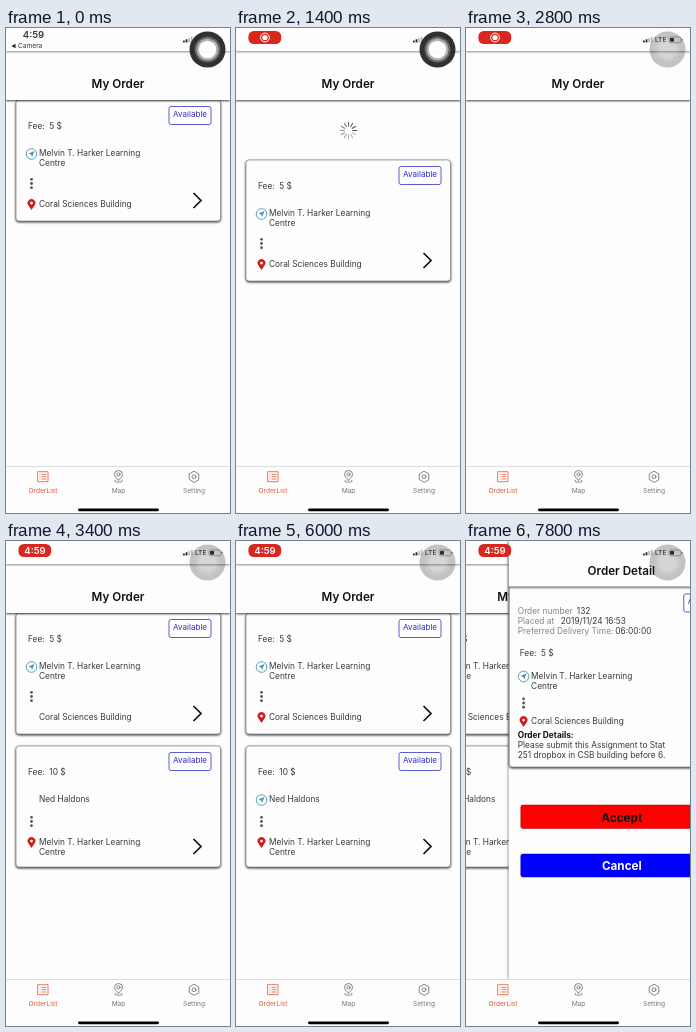
Write an HTML page that moves like this. It is 224x485 px and loops after 8 s.

```html
<!DOCTYPE html>
<html lang="en">
<head>
<meta charset="utf-8">
<title>My Order</title>
<style>
  html, body { margin: 0; width: 100%; height: 100%; overflow: hidden; background: #fefdfe; }
  svg { display: block; width: 100%; height: 100%; }
  text { font: 8.3px Inter, sans-serif; fill: #383838; white-space: pre; }
  .mid { text-anchor: middle; }
  .title { font-size: 11.7px; font-weight: 600; fill: #111; }
  .blue { fill: #2c2cc8; font-size: 8.1px; }
  .grey { fill: #858585; }
  .bold { font-weight: 700; fill: #111; }
  .time { font-size: 9.6px; font-weight: 600; }
  .tab { font-size: 6.6px; fill: #777; }
  .page { fill: #fefdfe; }
  .card { fill: #fefdfe; stroke: #888; stroke-width: .7; filter: drop-shadow(.8px 1px 1.1px rgba(0,0,0,.8)); }
  .bar { fill: #fefdfe; filter: drop-shadow(0 1px 1.1px rgba(0,0,0,.75)); }
  .line { fill: none; stroke: currentColor; stroke-width: .8; stroke-linecap: round; stroke-linejoin: round; }
</style>
</head>
<body>
<svg id="stage" viewBox="0 0 224 485" preserveAspectRatio="none"></svg>
<script>
const LOOP = 8000, STEP = 200, WIDTH = 224;
const hall = ['Melvin T. Harker Learning', 'Centre'];
const lab = ['Coral Sciences Building'];
const cafe = ['Ned Haldons'];

const text = (x, y, s, cls = '') => `<text x="${x}" y="${y}" class="${cls}">${s}</text>`;
const at = (x, y, body, attrs = '') => `<g transform="translate(${x} ${y})" ${attrs}>${body}</g>`;
const rect = (x, y, w, h, attrs) => `<rect x="${x}" y="${y}" width="${w}" height="${h}" ${attrs}/>`;
const disc = (x, y, r, attrs) => `<circle cx="${x}" cy="${y}" r="${r}" ${attrs}/>`;
const lines = (x, y, list) => list.map((s, i) => text(x, y + i * 10.2, s)).join('');

const compass = (x, y, cls) => at(x, y, `
  <circle r="5.3" fill="#fff" stroke="#5a9fb8" stroke-width="1"/>
  <path d="M2.9-2.9L.6 3.1L-.4.4L-3.1-.6Z" fill="#4a93b3"/>`, `class="${cls}"`);
const pin = (x, y, cls) => at(x, y, `
  <path d="M0 5.6C-1 3.6-2.4 2.4-3.3.6A3.9 3.9 0 1 1 3.3.6C2.4 2.4 1 3.6 0 5.6Z" fill="#cf1d1b"/>
  <circle cy="-1.4" r="1.4" fill="#fff"/>`, `class="${cls}"`);
const dots = (x, y) => [-4.2, 0, 4.2].map(d => disc(x, y + d, 1.4, 'fill="#555"')).join('');
const badge = (x, y) => rect(x, y, 42, 18, 'rx="2" fill="#fff" stroke="#4a4ad0" stroke-width=".9"')
  + text(x + 21, y + 10, 'Available', 'blue mid');

function orderCard(y, fee, from, to, fromClass, toClass) {
  const dy = (from.length - 2) * 8;
  return at(0, y, rect(10, 0, 204.5, 121, 'rx="3" class="card"')
    + text(22, 29, `Fee:  ${fee} $`) + badge(163, 6.5)
    + compass(25.5, 54, fromClass) + lines(33, 56.2, from)
    + dots(25.5, 83.5 + dy)
    + pin(25.5, 104.5 + dy, toClass) + lines(33, 107.2 + dy, to)
    + '<path d="M187.5 93L195 100.5L187.5 108" fill="none" stroke="#111" stroke-width="1.7"/>');
}

const spinner = Array.from({ length: 12 }, (_, i) =>
  `<path d="M0-4.3V-8.2" stroke="#555" stroke-width="1.1" stroke-linecap="round"
    opacity="${0.35 + 0.65 * i / 11}" transform="rotate(${i * 30})"/>`).join('');

const listPage = `<g id="list">
  ${rect(0, 0, WIDTH, 438, 'class="page"')}
  ${at(112.5, 102.5, `<g id="spinner">${spinner}</g>`)}
  <g id="cards">
    ${orderCard(72, 5, hall, lab, '', 'late')}
    <g id="second">${orderCard(205, 10, cafe, hall, 'late', '')}</g>
  </g>
  ${rect(0, 0, WIDTH, 72, 'class="bar"')}
  ${rect(0, 0, WIDTH, 23, 'class="bar" style="opacity:.6"')}
  ${text(112, 60, 'My Order', 'title mid')}
</g>`;

const detailPage = `<g id="detail">
  ${rect(0, 0, WIDTH, 438, 'class="page" style="filter:drop-shadow(-1px 0 1px rgba(0,0,0,.35))"')}
  ${rect(.5, 44, 223, 182, 'rx="3" class="card"')}
  ${rect(0, 0, WIDTH, 45.5, 'class="bar"')}
  ${text(112.5, 33.5, 'Order Detail', 'title mid')}
  ${badge(175, 53)}
  ${text(9, 72.5, 'Order number', 'grey')}${text(68, 72.5, '132')}
  ${text(9, 82.7, 'Placed at', 'grey')}${text(52, 82.7, '2019/11/24 16:53')}
  ${text(9, 93, 'Preferred Delivery Time:', 'grey')}${text(106.5, 93, '06:00:00')}
  ${text(11, 114.5, 'Fee:  5 $')}
  ${compass(14.8, 135.5)}${lines(22.3, 138.2, hall)}
  ${dots(14.8, 162)}
  ${pin(14.8, 180.5)}${lines(22.3, 182.7, lab)}
  ${text(9, 196.8, 'Order Details:', 'bold')}
  ${lines(9, 207, ['Please submit this Assignment to Stat', '251 dropbox in CSB building before 6.'])}
  ${rect(12, 264, 201, 23.5, 'rx="2" fill="#f00" stroke="#a00" stroke-width=".5"')}
  ${rect(12, 313, 201, 23, 'rx="2" fill="#00f" stroke="#00a" stroke-width=".5"')}
  <text x="113" y="281.3" class="title mid" style="font-weight:700">Accept</text>
  <text x="113" y="329.3" class="title mid" style="font-weight:700;fill:#fff">Cancel</text>
</g>`;

const hexagon = Array.from({ length: 6 }, (_, i) => {
  const a = Math.PI * (i / 3 + .5);
  return `${5.5 * Math.cos(a)},${5.5 * Math.sin(a)}`;
}).join(' ');

const tabs = `
  ${rect(0, 438, WIDTH, 47, 'class="page"')}
  ${rect(0, 438, WIDTH, .7, 'fill="#d0d0d0"')}
  ${at(37, 448.7, `<path class="line" d="M-5-5H5V5H-5ZM-1-2.3H3M-1 0H3M-1 2.3H3M-3-2.3H-2.9M-3 0H-2.9M-3 2.3H-2.9"/>`, 'color="#dd5b36"')}
  ${at(112.5, 448.2, `<path class="line" d="M0 4C-1.5 2-4 .5-4-1.7A4 4 0 0 1 4-1.7C4 .5 1.5 2 0 4ZM-3 4C-5 5.8-2 6 0 6S5 5.8 3 4"/>
    <circle class="line" cy="-1.7" r="1.6"/>`, 'color="#666"')}
  ${at(188, 448.7, `<polygon class="line" points="${hexagon}"/><circle class="line" r="1.9"/>`, 'color="#666"')}
  <text x="37" y="465" class="tab mid" style="fill:#dd5b36">OrderList</text>
  ${text(112.5, 465, 'Map', 'tab mid')}${text(188, 465, 'Setting', 'tab mid')}
  ${rect(72, 480.4, 81, 2.8, 'rx="1.4" fill="#000"')}`;

const statusBar = `
  <g id="plain">
    ${text(27.5, 10.2, '4:59', 'time mid')}
    <path d="M5.5 18L9.5 15.8V20.2Z" fill="#222"/>
    <text x="12" y="20.2" style="font-size:6.6px">Camera</text>
  </g>
  <g id="pill">
    ${rect(12.4, 3, 32.8, 13, 'rx="5.5" fill="#d9261f"')}
    <g id="record">${disc(29, 9.5, 4.4, 'fill="none" stroke="#fff"')}${disc(29, 9.5, 2.6, 'fill="#fff"')}</g>
    <text id="clock" x="29" y="13" class="time mid" style="fill:#fff">4:59</text>
  </g>
  ${[0, 1, 2, 3].map(i => rect(177 + i * 2.6, 12.6 - i * 1.3, 1.8, 1.8 + i * 1.3, `fill="${i < 2 ? '#222' : '#bbb'}"`)).join('')}
  <text x="189" y="14.4" style="font-size:6.6px;font-weight:500">LTE</text>
  ${rect(203, 9, 12, 5.8, 'rx="1.6" fill="none" stroke="#888" stroke-width=".7"')}
  ${rect(204, 10, 4, 3.8, 'rx=".7" fill="#222"')}
  ${rect(215.7, 10.8, 1, 2.2, 'rx=".5" fill="#888"')}
  <g id="button">
    ${disc(201.5, 21.5, 18, 'fill="#222"')}
    <g id="rings">
      ${disc(201.5, 21.5, 13, 'fill="#5a5a5a"')}
      ${disc(201.5, 21.5, 11, 'fill="#aaa"')}
      ${disc(201.5, 21.5, 8.8, 'fill="#fff"')}
    </g>
  </g>`;

const stage = document.getElementById('stage');
stage.innerHTML = listPage + detailPage + tabs + statusBar;
const el = id => document.getElementById(id);
const late = stage.querySelectorAll('.late');

const show = (node, on) => { node.style.display = on ? '' : 'none'; };
const move = (id, x, y) => el(id).setAttribute('transform', `translate(${x} ${y})`);
const fade = (id, opacity) => el(id).setAttribute('opacity', opacity);
const ramp = (t, from, to) => Math.min(1, Math.max(0, (t - from) / (to - from)));
const smooth = p => p * p * (3 - 2 * p);

// Ease-out of the page push, cubic-bezier(.2833, .99, .3183, .99).
function pushEase(x) {
  const curve = (s, a, b) => 3 * s * (1 - s) ** 2 * a + 3 * s * s * (1 - s) * b + s ** 3;
  let lo = 0, hi = 1;
  for (let i = 0; i < 24; i++) {
    const s = (lo + hi) / 2;
    if (curve(s, .2833, .3183) < x) lo = s; else hi = s;
  }
  return curve(lo, .99, .99);
}

function render(t) {
  const loaded = t >= 3400;
  const pull = 84 * smooth(ramp(t, 400, 1000)) - 24 * smooth(ramp(t, 1000, 1400));
  show(el('cards'), t < 2200 || loaded);
  show(el('second'), loaded);
  move('cards', 0, loaded ? 0 : pull);
  late.forEach(icon => show(icon, t < 2200 || t >= 3600));

  show(el('spinner'), t >= 800 && t < 2200);
  el('spinner').setAttribute('transform', `rotate(${Math.floor(t / 1000 * 12) * 30})`);
  fade('spinner', ramp(t, 600, 1000));

  show(el('plain'), t < 600);
  show(el('pill'), t >= 600);
  show(el('record'), t < 3200);
  show(el('clock'), t >= 3200);
  const idle = ramp(t, 1800, 2400);
  fade('button', 0.93 - 0.67 * idle);
  fade('rings', 1 - 0.7 * idle);

  const push = pushEase(ramp(t, 7650, 8150));
  move('list', -0.3 * WIDTH * push, 0);
  move('detail', WIDTH * (1 - push), 0);
  show(el('detail'), push > 0);
}

const start = performance.now();
function tick() {
  const t = (performance.now() - start) % LOOP;
  render(Math.floor(t / STEP) * STEP);
  requestAnimationFrame(tick);
}
tick();
</script>
</body>
</html>
```
